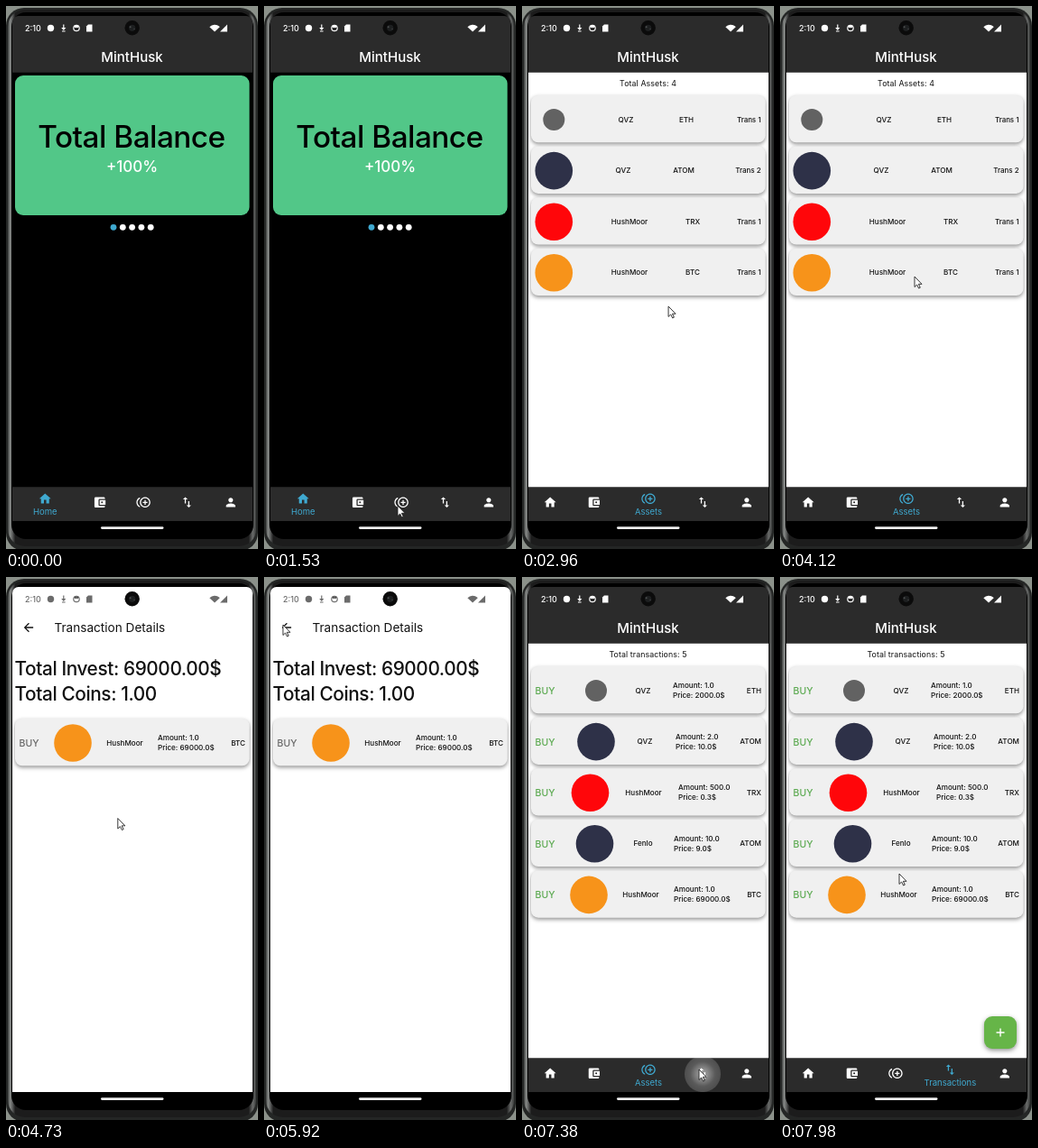
An HTML page with a canvas for the animation above (8000 ms loop, 279 by 602 pixels).

```html
<!DOCTYPE html>
<html lang="en">
<head>
<meta charset="utf-8">
<title>Wallet app</title>
<style>
html, body { margin: 0; width: 100%; height: 100%; overflow: hidden; background: #000; }
canvas { display: block; width: 279px; height: 602px; }
</style>
</head>
<body>
<canvas id="stage"></canvas>
<script>
const LOOP = 8000, W = 279, H = 602;
const BLUE = [63, 169, 208], WHITE = [255, 255, 255];
const BAR = '#2b2b2b', PAGE_TOP = 73.7, NAV_TOP = 533.3;
const canvas = document.getElementById('stage');
const ratio = window.devicePixelRatio || 1;
canvas.width = W * ratio;
canvas.height = H * ratio;
const ctx = canvas.getContext('2d');

const ICON = {
  home: 'M10 20v-6h4v6h5v-8h3L12 3 2 12h3v8z',
  wallet: 'M21 18v1c0 1.1-.9 2-2 2H5c-1.11 0-2-.9-2-2V5c0-1.1.89-2 2-2h14c1.1 0 2 .9 2 2v1h-9c-1.11 0-2 .9-2 2v8c0 1.1.89 2 2 2h9zm-9-2h10V8H12v8zm4-2.5c-.83 0-1.5-.67-1.5-1.5s.67-1.5 1.5-1.5 1.5.67 1.5 1.5-.67 1.5-1.5 1.5z',
  assets: 'M16 8h-2v3h-3v2h3v3h2v-3h3v-2h-3zM2 12c0-2.79 1.64-5.2 4.01-6.32V3.52C2.52 4.76 0 8.09 0 12s2.52 7.24 6.01 8.48v-2.16C3.64 17.2 2 14.79 2 12zm13-9c-4.96 0-9 4.04-9 9s4.04 9 9 9 9-4.04 9-9-4.04-9-9-9zm0 16c-3.86 0-7-3.14-7-7s3.14-7 7-7 7 3.14 7 7-3.14 7-7 7z',
  swap: 'M16 17V10h-2v7h-3l4 4 4-4zM9 3 5 7h3v7h2V7h3z',
  person: 'M12 12c2.21 0 4-1.79 4-4s-1.79-4-4-4-4 1.79-4 4 1.79 4 4 4zm0 2c-2.67 0-8 1.34-8 4v2h16v-2c0-2.66-5.33-4-8-4z',
  back: 'M20 11H7.83l5.59-5.59L12 4l-8 8 8 8 1.41-1.41L7.83 13H20z'
};
for (const key in ICON) ICON[key] = new Path2D(ICON[key]);
const POINTER = new Path2D('M0 0V11.5L2.6 9 4.6 13 6.3 12.2 4.4 8.3H8Z');

const COIN = { ETH: '#626262', ATOM: '#2e3148', TRX: '#ff060a', BTC: '#f7931a' };
const ASSETS = [
  { wallet: 'QVZ', wx: 115, coin: 'ETH', cx: 182, count: 1 },
  { wallet: 'QVZ', wx: 112, coin: 'ATOM', cx: 179, count: 2 },
  { wallet: 'HushMoor', wx: 119, coin: 'TRX', cx: 189, count: 1 },
  { wallet: 'HushMoor', wx: 119, coin: 'BTC', cx: 189, count: 1 }
];
const TRADES = [
  { wallet: 'QVZ', wx: 134, coin: 'ETH', lx: 82, amount: '1.0', price: '2000.0', ax: 167 },
  { wallet: 'QVZ', wx: 136, coin: 'ATOM', lx: 82, amount: '2.0', price: '10.0', ax: 170 },
  { wallet: 'HushMoor', wx: 134.5, coin: 'TRX', lx: 75.5, amount: '500.0', price: '0.3', ax: 173 },
  { wallet: 'Fenlo', wx: 134, coin: 'ATOM', lx: 80.5, amount: '10.0', price: '9.0', ax: 168 },
  { wallet: 'HushMoor', wx: 131.5, coin: 'BTC', lx: 74, amount: '1.0', price: '69000.0', ax: 168 }
];
const TABS = [['home', 'Home'], ['wallet', ''], ['assets', 'Assets'], ['swap', 'Transactions'], ['person', '']];

// Pointer path: time, x, y
const TRACK = [
  [740, 86, 585], [1000, 106, 574], [1300, 138, 560], [1530, 148, 554], [2590, 148, 554],
  [2670, 150, 564], [2800, 157, 470], [2950, 163, 340], [3200, 142, 180], [3350, 134, 106],
  [3440, 148, 133], [3560, 153, 200], [3810, 149, 300], [4560, 149, 300], [4730, 124, 268],
  [4790, 112, 239], [5100, 70, 150], [5400, 32, 75], [5650, 21, 53], [6650, 21, 53],
  [6710, 28, 82], [6950, 115, 350], [7200, 196, 546], [7560, 196, 546], [7760, 165, 420], [7980, 132, 329]
];

const clamp = v => Math.max(0, Math.min(1, v));
const ramp = (t, from, to) => clamp((t - from) / (to - from));
const ease = p => p * p * (3 - 2 * p);
const phase = (t, from, to) => ease(ramp(t, from, to));
const mix = (a, b, p) => a + (b - a) * p;
const tint = (a, b, p) => `rgb(${a.map((v, i) => Math.round(mix(v, b[i], p)))})`;

function text(str, x, y, size, { color = '#111', align = 'left', weight = 500, spacing = 0 } = {}) {
  ctx.font = `${weight} ${size}px Inter, sans-serif`;
  ctx.letterSpacing = spacing + 'px';
  ctx.textAlign = align;
  ctx.fillStyle = color;
  ctx.fillText(str, x, y);
}
function rect(x, y, w, h, color, r = 0) {
  ctx.fillStyle = color;
  ctx.beginPath();
  ctx.roundRect(x, y, w, h, r);
  ctx.fill();
}
function circle(x, y, r, color) {
  ctx.fillStyle = color;
  ctx.beginPath();
  ctx.arc(x, y, r, 0, 7);
  ctx.fill();
}
function polygon(color, ...points) {
  ctx.fillStyle = color;
  ctx.beginPath();
  points.forEach(p => ctx.lineTo(...p));
  ctx.fill();
}
function layer(draw) {
  ctx.save();
  draw();
  ctx.restore();
}
function shadowed(blur, dy, draw) {
  layer(() => {
    ctx.shadowColor = 'rgba(0,0,0,.42)';
    ctx.shadowBlur = blur * ratio;
    ctx.shadowOffsetY = dy * ratio;
    draw();
  });
}
function icon(name, x, y, color) {
  layer(() => {
    ctx.translate(x, y);
    ctx.scale(.645, .645);
    ctx.translate(-12, -12);
    ctx.fillStyle = color;
    ctx.fill(ICON[name]);
  });
}

function phone() {
  rect(0, 0, W, H, '#8b918a');
  rect(0, 2, W, 602, '#242625', 20);
  const metal = ctx.createLinearGradient(2, 0, 277, 0);
  [[0, '#3a3c3b'], [.009, '#858886'], [.016, '#6a6c6b'], [.03, '#1c1c1c'], [.97, '#1c1c1c'], [.986, '#6a6c6b'], [1, '#3a3c3b']]
    .forEach(stop => metal.addColorStop(...stop));
  rect(2, 4, 275, 595, metal, 19);
  rect(6, 7, 268, 584, '#000', 16);
}

function statusBar(color) {
  text('2:10', 21, 27.7, 9, { color });
  circle(49.5, 24.5, 3.7, color);
  rect(63.2, 20.5, 1.2, 3.5, color);
  polygon(color, [61.2, 24], [66.4, 24], [63.8, 27]);
  rect(62, 27.4, 3.6, 1, color);
  ctx.strokeStyle = color;
  ctx.lineWidth = 1.2;
  ctx.beginPath();
  ctx.arc(78, 24.5, 3.2, 0, 7);
  ctx.stroke();
  rect(76, 22, 4, 2, color);
  polygon(color, [89, 22.5], [91, 20.5], [95.5, 20.5], [95.5, 28.5], [89, 28.5]);
  ctx.fillStyle = color;
  ctx.beginPath();
  ctx.moveTo(231, 28.5);
  ctx.arc(231, 28.5, 7.8, -Math.PI * .76, -Math.PI * .24);
  ctx.fill();
  polygon(color, [237, 28.5], [245, 28.5], [245, 20.5]);
}

function card(y) {
  shadowed(4, 2, () => rect(10, y, 259.5, 52.3, '#f0f0f0', 8));
}
function coin(name, x, y) {
  circle(x, y, name === 'ETH' ? 12 : 20.8, COIN[name]);
}
function pageBackground(color) {
  rect(7, PAGE_TOP, 266, 534 - PAGE_TOP, color);
}

function homePage() {
  pageBackground('#000');
  rect(10, 77, 259.5, 155, '#52c788', 9);
  text('Total Balance', 139, 156.5, 33.3, { color: '#000', align: 'center', spacing: -.5 });
  text('+100%', 139.5, 184, 17, { color: '#fff', align: 'center' });
  for (let i = 0; i < 5; i++) circle(119 + i * 10.3, 245.3, 3.4, tint(i ? WHITE : BLUE, WHITE, 0));
}

function listPage(heading, rows, drawRow) {
  pageBackground('#fff');
  text(heading, 139.5, 89, 8.8, { align: 'center', weight: 400, spacing: .1 });
  rows.forEach((row, i) => {
    const y = 99 + i * 56.6;
    card(y);
    drawRow(row, y);
  });
}

function assetRow({ wallet, wx, coin: name, cx, count }, y) {
  coin(name, 35.3, y + 27);
  text(wallet, wx, y + 29.5, 8.1, { align: 'center' });
  text(name, cx, y + 29.5, 8.1, { align: 'center' });
  text('Trans ' + count, 264.5, y + 29.5, 7.9, { align: 'right' });
}

function tradeRow({ wallet, wx, coin: name, lx, amount, price, ax }, y, buyColor = '#5aa94f') {
  text('BUY', 14.5, y + 31, 10.5, { color: buyColor });
  coin(name, lx, y + 27);
  text(wallet, wx, y + 29.5, 8.1, { align: 'center' });
  text('Amount: ' + amount, ax, y + 24, 8.1);
  text(`Price: ${price}$`, ax, y + 35, 8.1);
  text(name, 265, y + 29.5, 8.1, { align: 'right' });
}

function addButton(size) {
  if (!size) return;
  layer(() => {
    ctx.translate(244, 505);
    ctx.scale(size, size);
    shadowed(5, 2, () => rect(-18, -18, 36, 36, '#66b548', 9));
    rect(-4.5, -.7, 9, 1.4, '#fff');
    rect(-.7, -4.5, 1.4, 9, '#fff');
  });
}

function glow(x, grow, fade) {
  const alpha = grow ? 1 - fade : 0;
  if (!alpha) return;
  const shade = ctx.createRadialGradient(x, 551, 0, x, 551, 23);
  shade.addColorStop(0, `rgba(255,255,255,${.62 * alpha})`);
  shade.addColorStop(.6, `rgba(255,255,255,${.22 * alpha})`);
  shade.addColorStop(1, `rgba(255,255,255,${.14 * alpha})`);
  circle(x, 551, mix(6, 22.5, grow), shade);
}

function navBar(t) {
  const toAssets = phase(t, 1940, 2260), toTrades = phase(t, 7480, 7760);
  const selected = [1 - toAssets, 0, toAssets - toTrades, toTrades, 0];
  const unit = 266 / 5.5;
  layer(() => {
    ctx.beginPath();
    ctx.rect(7, NAV_TOP, 266, 571 - NAV_TOP);
    ctx.clip();
    rect(7, 533, 266, 38, BAR);
    glow(152, phase(t, 1790, 1960), phase(t, 2120, 2590));
    glow(200, phase(t, 7260, 7420), phase(t, 7560, 7900));
    let left = 7;
    TABS.forEach(([name, label], i) => {
      const on = selected[i], width = unit * (1 + on / 2), x = left + width / 2;
      const color = tint(WHITE, BLUE, on);
      icon(name, x, 550.3 - 4 * on, color);
      if (label && on > 0) layer(() => {
        ctx.globalAlpha = on;
        text(label, x, 564, 9.5 * mix(.8, 1, on), { color, align: 'center', weight: 400 });
      });
      left += width;
    });
  });
}

function detailsPage(show, t) {
  if (!show) return;
  layer(() => {
    ctx.globalAlpha = show;
    ctx.translate(140, 291);
    ctx.scale(mix(.9, 1, show), mix(.9, 1, show));
    ctx.translate(-140, -291);
    rect(7, 11, 266, 560, '#fff');
    const press = ramp(t, 5920, 6040);
    if (press) circle(25, 56, 15 * press, 'rgba(0,0,0,.1)');
    icon('back', 25, 56, '#111');
    text('Transaction Details', 53.5, 60.5, 13.6, { weight: 400 });
    text('Total Invest: 69000.00$', 9.5, 109, 20.8, { spacing: -.4 });
    text('Total Coins: 1.00', 9.5, 137, 20.8, { spacing: -.4 });
    card(157);
    tradeRow(TRADES[4], 157, '#666');
  });
}

function pointer(t) {
  if (t < TRACK[0][0]) return;
  const next = TRACK.findIndex(p => p[0] > t);
  const b = next < 0 ? TRACK.at(-1) : TRACK[next];
  const a = next < 0 ? b : TRACK[next - 1];
  const p = a === b ? 0 : ramp(t, a[0], b[0]);
  layer(() => {
    ctx.translate(mix(a[1], b[1], p), mix(a[2], b[2], p));
    ctx.fillStyle = '#fff';
    ctx.strokeStyle = '#222';
    ctx.lineWidth = .9;
    ctx.fill(POINTER);
    ctx.stroke(POINTER);
  });
}

function screen(t) {
  ctx.beginPath();
  ctx.roundRect(7, 11, 266, 577, 7);
  ctx.clip();
  rect(7, 11, 266, 63, BAR);
  text('MintHusk', 139.5, 62, 15, { color: '#fff', align: 'center' });
  if (t < 1900) homePage();
  else if (t < 7380) listPage('Total Assets: 4', ASSETS, assetRow);
  else listPage('Total transactions: 5', TRADES, (row, y) => tradeRow(row, y));
  addButton(phase(t, 7480, 7740));
  navBar(t);
  detailsPage(phase(t, 4240, 4520) - phase(t, 6040, 6320), t);
  statusBar(t > 4380 && t < 6440 ? 'rgba(0,0,0,.58)' : '#fff');
}

function draw(t) {
  ctx.setTransform(ratio, 0, 0, ratio, 0, 0);
  phone();
  layer(() => screen(t));
  rect(105, 577.3, 69.5, 2.6, '#eee', 1.3);
  circle(139.7, 24.3, 8.2, '#0b0b0b');
  circle(139.7, 24.3, 3.6, '#1d1f20');
  circle(137.6, 23.2, 1, '#4d5051');
  circle(142, 25.5, .8, '#3d4041');
  pointer(t);
}

const start = performance.now();
function tick() {
  draw((performance.now() - start) % LOOP);
  requestAnimationFrame(tick);
}
tick();
</script>
</body>
</html>
```
